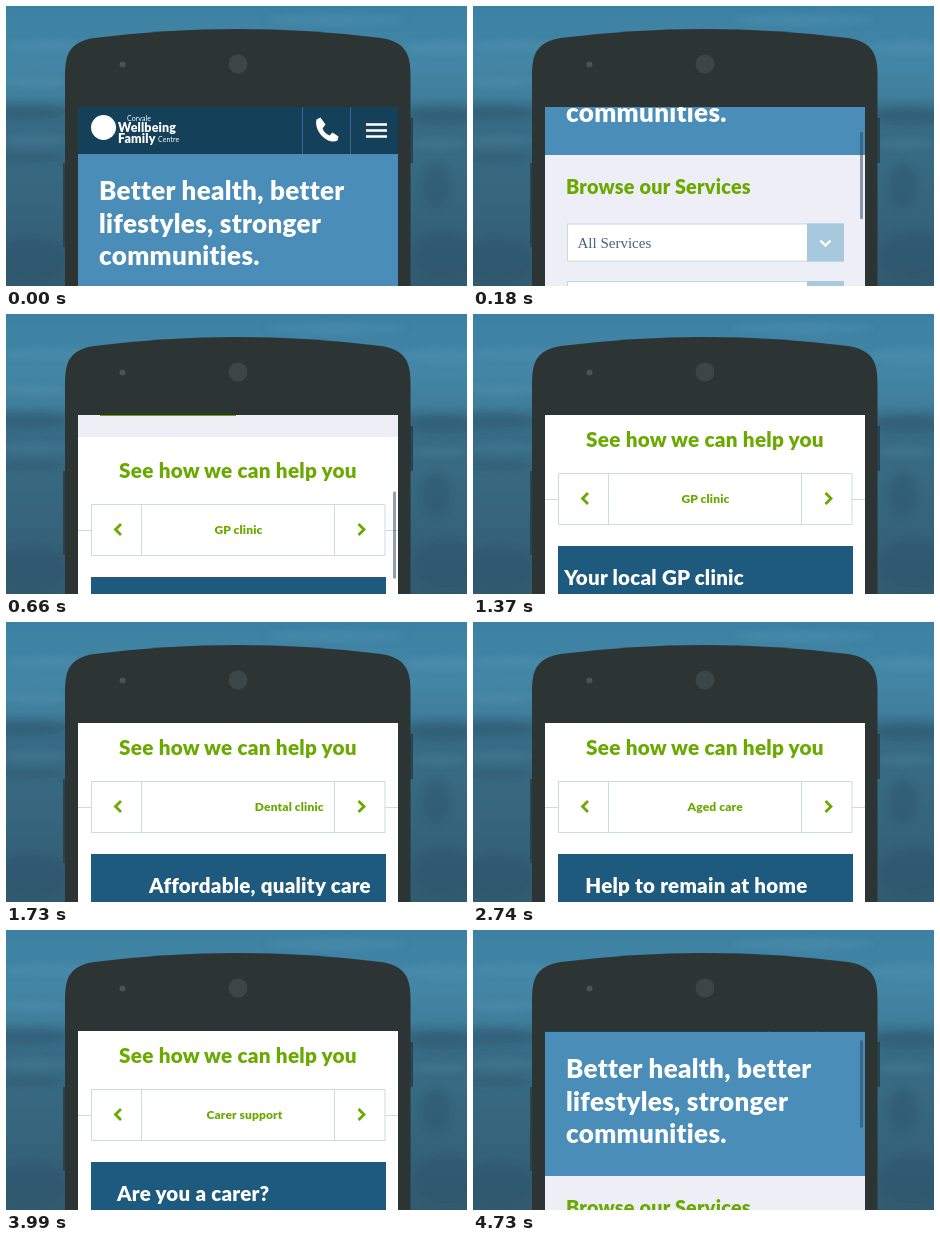
These frames come from a looping animation (461 px wide and 280 px high, 5730 ms). An HTML page:

```html
<!DOCTYPE html>
<html lang="en">
<head>
<meta charset="utf-8">
<title>Health service mobile site</title>
<style>
  html, body { margin: 0; width: 100%; height: 100%; overflow: hidden; background: #35647c; }
  svg { display: block; }
  text { font-family: Lato, sans-serif; font-weight: 900; font-variant-ligatures: none; letter-spacing: .012em; }
  .hero { font-size: 26px; fill: #fff; }
  .green { fill: #6aaa00; }
  .tab { font-size: 12px; text-anchor: middle; }
  .banner { font-size: 20.5px; fill: #fff; }
  .small { font-size: 7px; font-weight: 400; }
  .button { font-size: 11.5px; font-weight: 700; letter-spacing: 1.5px; fill: #fff; }
  .field { font: 15px "Liberation Serif", serif; letter-spacing: 0; fill: #46647a; }
  .line { fill: none; stroke: #c8dbe6; }
  .icon { fill: none; stroke: #fff; stroke-width: 2.4; }
</style>
</head>
<body>
<svg width="461" height="280" viewBox="0 0 461 280">
  <defs>
    <linearGradient id="land" x2="0" y2="1">
      <stop offset="0" stop-color="#3c81a3"/>
      <stop offset=".2" stop-color="#4386a6"/>
      <stop offset=".32" stop-color="#407f9c"/>
      <stop offset=".38" stop-color="#386c86"/>
      <stop offset=".55" stop-color="#386a83"/>
      <stop offset="1" stop-color="#325b71"/>
    </linearGradient>
    <filter id="soft" x="-20%" y="-20%" width="140%" height="140%"><feGaussianBlur stdDeviation="3"/></filter>
  </defs>

  <!-- hazy landscape -->
  <rect width="461" height="280" fill="url(#land)"/>
  <g filter="url(#soft)">
    <g fill="#5694b1" opacity=".4">
      <ellipse cx="45" cy="40" rx="50" ry="5"/>
      <ellipse cx="330" cy="14" rx="70" ry="5"/>
      <ellipse cx="440" cy="42" rx="45" ry="7"/>
      <ellipse cx="28" cy="76" rx="36" ry="5"/>
    </g>
    <g fill="#2a5269" opacity=".35">
      <ellipse cx="20" cy="106" rx="42" ry="8"/>
      <ellipse cx="436" cy="110" rx="36" ry="10"/>
      <ellipse cx="22" cy="152" rx="38" ry="5"/>
      <ellipse cx="430" cy="180" rx="14" ry="22"/>
      <ellipse cx="24" cy="255" rx="40" ry="22"/>
      <ellipse cx="440" cy="250" rx="34" ry="24"/>
    </g>
    <g fill="#4a7f98" opacity=".4">
      <ellipse cx="30" cy="134" rx="36" ry="5"/>
      <ellipse cx="432" cy="138" rx="30" ry="5"/>
    </g>
  </g>

  <!-- phone -->
  <path fill="#2a4350" d="M57 157h3v84h-3zM403 112h4v45h-4z"/>
  <path fill="#2d3434" d="M59 280V70C59 47 64 36 88 32Q160 23 231.500 23T375 32C399 36 404.500 47 404.500 70V280z"/>
  <circle cx="116.5" cy="58.5" r="3" fill="#4a5353"/>
  <circle cx="232" cy="58" r="9.5" fill="#3d4646"/>

  <svg x="72" y="101" width="320" height="179">
    <rect width="320" height="179" fill="#fff"/>
    <g id="page">
      <!-- header -->
      <rect x="72" width="320" height="47" fill="#14405a"/>
      <circle cx="97.5" cy="20.5" r="12.5" fill="#fff"/>
      <g fill="#fff">
        <text class="small" x="121" y="14">Corvale</text>
        <text x="112" y="24.5" font-size="12.5">Wellbeing</text>
        <text x="112" y="35.5" font-size="12.5">Family</text>
        <text class="small" x="152" y="35">Centre</text>
        <path d="M310.500 12.500l4-2 5 7-3 4q2 5 7 7l3-3 6 4-1 4c-9 5-24-9-21-21z"/>
      </g>
      <path stroke="#37698a" d="M296.500 0v47M344.500 0v47"/>
      <path class="icon" d="M360 17.500h21M360 23.500h21M360 29.500h21"/>

      <!-- hero -->
      <rect x="72" y="47" width="320" height="144" fill="#4a8db8"/>
      <g class="hero">
        <text x="93" y="93">Better health, better</text>
        <text x="93" y="125.5">lifestyles, stronger</text>
        <text x="93" y="158">communities.</text>
      </g>

      <!-- search form -->
      <rect x="72" y="191" width="320" height="298" fill="#eeeef7"/>
      <text class="green" x="93" y="230" font-size="19.8">Browse our Services</text>
      <g id="fields"></g>
      <rect x="94" y="432" width="136" height="36" fill="#6aab00"/>
      <text class="button" x="123.5" y="454.5">SEARCH</text>
      <path class="icon" d="M200 450h13M207.500 444l6 6-6 6"/>

      <!-- services -->
      <text class="green" x="232" y="530" font-size="20.7" text-anchor="middle">See how we can help you</text>
      <path class="line" d="M72 582.500h13M379 582.500h13M85.500 556.500h293.500v51h-293.500zM135.500 557v50M328.500 557v50"/>
      <path fill="none" stroke="#6aaa00" stroke-width="2.800" d="M115 576l-5.500 5.500 5.500 5.500M352.500 576l5.500 5.500-5.500 5.500"/>
      <svg x="136" y="557" width="192" height="50"><g id="tabs"></g></svg>
      <rect x="85" y="629" width="295" height="120" fill="#1d5a7e"/>
      <svg x="85" y="629" width="295" height="120"><g id="banners"></g></svg>
    </g>
    <rect id="thumb" x="315" width="3" height="87.500" rx="1.500" fill="#23415a" fill-opacity=".5"/>
  </svg>
</svg>

<script>
const $ = id => document.getElementById(id);
const LOOP = 5730, STEP = 30;
const TAB_PITCH = 195, TAB_SHIFT = 193, BANNER_WIDTH = 295;

const services = [
  ['GP clinic', 'Your local GP clinic'],
  ['Dental clinic', 'Affordable, quality care'],
  ['Aged care', 'Help to remain at home'],
  ['Carer support', 'Are you a carer?']
];
$('tabs').innerHTML = services.map(([name], i) =>
  `<text class="tab green" x="${96.5 + i * TAB_PITCH}" y="29">${name}</text>`).join('');
$('banners').innerHTML = services.map(([, title], i) =>
  `<text class="banner" x="${26 + i * BANNER_WIDTH}" y="39">${title}</text>`).join('');
$('fields').innerHTML = ['All Services', 'All Locations', 'Everyone'].map((label, i) =>
  `<g transform="translate(94 ${259.5 + i * 57.5})">
    <rect x=".5" y=".5" width="276" height="37" fill="#fff" stroke="#c5d8e4"/>
    <rect x="240" width="37" height="38" fill="#a6c9de"/>
    <path class="icon" d="M253.500 17l5 5 5-5"/>
    <text class="field" x="10.500" y="24">${label}</text>
  </g>`).join('');

// Page scroll: time, position, speed
const scrollKeys = [
  [0, 0, .7], [390, 316, .75], [660, 467, .3], [870, 498, 0],
  [4460, 498, 0], [4730, 46, -1.2]
];
// Each swipe: drag begins, finger lifts, share dragged by then
const swipes = [[1340, 1595, .57], [2380, 2505, .85], [3420, 3560, .75]];
const runStarts = [0, 1370, 2410, 3450, 4490];

const clamp = x => Math.min(1, Math.max(0, x));
const easeOut = x => 1 - (1 - clamp(x)) ** 2.3;

function scrollAt(t) {
  const i = scrollKeys.findIndex(key => key[0] > t);
  if (i < 0) return scrollKeys.at(-1)[1];
  const [t0, p0, v0] = scrollKeys[i - 1], [t1, p1, v1] = scrollKeys[i];
  const d = t1 - t0, u = (t - t0) / d, w = 1 - u;
  return w * w * ((1 + 2 * u) * p0 + u * d * v0) + u * u * ((3 - 2 * u) * p1 - w * d * v1);
}

function draw(now) {
  const time = now % LOOP;
  const start = runStarts.findLast(s => s <= time);
  const t = start + Math.floor((time - start) / STEP) * STEP;

  const scroll = Math.round(scrollAt(t));
  $('page').setAttribute('transform', `translate(-72 ${-scroll})`);
  $('thumb').setAttribute('y', 2 + scroll / 6.3);
  $('thumb').setAttribute('visibility', t > 0 && t < 870 || t >= 4490 ? 'visible' : 'hidden');

  let tab = 0, banner = 0;
  for (const [begin, lift, share] of swipes) {
    const settle = easeOut((t - lift) / 300);
    tab += settle;
    banner += share * clamp((t - begin) / (lift - begin)) + (1 - share) * settle;
  }
  $('tabs').setAttribute('transform', `translate(${-tab * TAB_SHIFT})`);
  $('banners').setAttribute('transform', `translate(${-banner * BANNER_WIDTH})`);
}

const origin = performance.now();
function tick() {
  draw(performance.now() - origin);
  requestAnimationFrame(tick);
}
tick();
</script>
</body>
</html>
```
